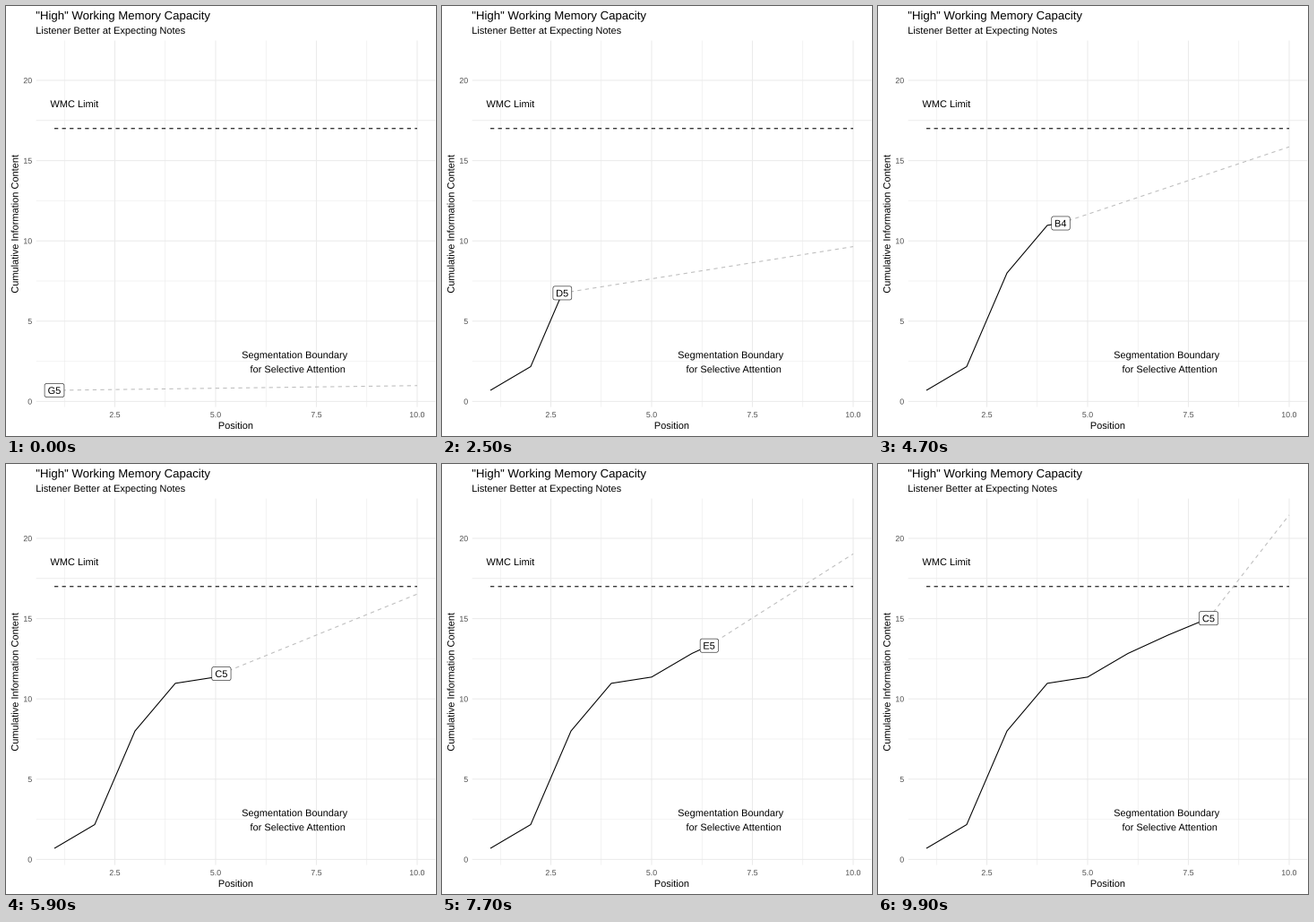
Animation of 480 by 480 pixels, one loop 10 s. Source, as a matplotlib script:

```python
import numpy as np
import matplotlib.pyplot as plt
from matplotlib.animation import FuncAnimation
from matplotlib.patches import FancyBboxPatch, PathPatch
from matplotlib.textpath import TextPath
from matplotlib.transforms import Affine2D

SIZE, DPI = 480, 72
FRAMES, INTERVAL = 100, 100
LINE = 1.07
LEFT, RIGHT, TOP, BOTTOM = 33.75, 479.25, 38.6, 447.6
FONT = {"family": "Liberation Sans"}

NOTES = ["G5", "F5", "D5", "B4", "C5", "E5", "D5", "C5"]
INFO = np.array([0.69, 2.17, 8.0, 10.97, 11.36, 12.83, 13.98, 15.02])
POS = np.arange(1, 9)
# Each note lands on the nearest whole frame.
KEYS = np.round((POS - 1) * (FRAMES - 1) / 7)
LIMIT = 17


def px(pos):
    return 9 + 45 * pos


def py(info):
    return 441.4 - 17.92 * info


def text_path(s, size, x, y, align="center", angle=0):
    """Outline of s with its baseline at (x, y) in pixels, y pointing down."""
    path = TextPath((0, 0), s, size=size, prop=FONT)
    box = path.get_extents()
    shift = {"left": 0, "center": (box.x0 + box.x1) / 2, "right": box.x1}[align]
    move = Affine2D().translate(-shift, 0).rotate_deg(angle).scale(1, -1).translate(x, y)
    return path.transformed(move)


fig = plt.figure(figsize=(SIZE / DPI, SIZE / DPI), dpi=DPI, facecolor="white")
ax = fig.add_axes([0, 0, 1, 1])
ax.set_xlim(0, SIZE)
ax.set_ylim(SIZE, 0)
ax.axis("off")


def write(s, size, x, y, align="center", angle=0, color="black", z=5):
    path = text_path(s, size, x, y, align, angle)
    return ax.add_patch(PathPatch(path, fc=color, lw=0, zorder=z))


def stroke(xs, ys, color, width=LINE, style="-", z=2):
    line, = ax.plot(xs, ys, color=color, lw=width, ls=style, zorder=z,
                    solid_capstyle="butt", dash_capstyle="butt")
    line.set_snap(False)
    return line


def grid(xs, ys, width):
    for x in xs:
        stroke([px(x)] * 2, [TOP, BOTTOM], "#EBEBEB", width, z=1)
    for y in ys:
        stroke([LEFT, RIGHT], [py(y)] * 2, "#EBEBEB", width, z=1)


x_ticks = np.arange(2.5, 10.1, 2.5)
y_ticks = np.arange(0, 21, 5)
grid(x_ticks - 1.25, y_ticks[:-1] + 2.5, LINE / 2)
grid([], [17.5], LINE / 2)
grid(x_ticks, y_ticks, LINE)

for x in x_ticks:
    write(f"{x:.1f}", 8.8, px(x), 459.2, color="#4D4D4D")
for y in y_ticks:
    write(str(y), 8.8, 28.8, py(y) + 3.2, "right", color="#4D4D4D")

write('"High" Working Memory Capacity', 13.2, LEFT - 0.5, 15, "left")
write("Listener Better at Expecting Notes", 11, LEFT - 0.5, 31, "left")
write("Position", 11, (LEFT + RIGHT) / 2, 472)
write("Cumulative Information Content", 11, 13.6, (TOP + BOTTOM) / 2, angle=90)
write("WMC Limit", 11, 76.3, 113)
write("Segmentation Boundary", 11, 322.4, 393.2)
write("for Selective Attention", 11, 325.4, 409.2)

DASH = (0, (4, 4))
stroke([px(1), px(10)], [py(LIMIT)] * 2, "black", style=DASH)
forecast = stroke([], [], "#BEBEBE", style=DASH, z=3)
trace = stroke([], [], "black", z=4)

tag = ax.add_patch(FancyBboxPatch((0, 0), 20, 15.1, fc="white", ec="black", lw=0.55,
                                  boxstyle="round,pad=0,rounding_size=2.16",
                                  zorder=6, snap=False))
note = write(NOTES[0], 11, 0, 0, z=7)


def update(frame):
    pos = np.interp(frame, KEYS, POS)
    info = np.interp(frame, KEYS, INFO)
    x, y = px(pos), py(info)

    past = KEYS < frame
    trace.set_data(np.append(px(POS[past]), x), np.append(py(INFO[past]), y))
    forecast.set_data([x, px(10)], [y, py(info * 10 / 7)])

    # The name switches halfway between two notes.
    name = NOTES[int(pos - 0.5 + 1e-9)]
    path = text_path(name, 11, x, y + 3.95)
    note.set_path(path)
    width = path.get_extents().width + 8.2
    tag.set_bounds(x - width / 2, y - 7.55, width, 15.1)
    return forecast, trace, tag, note


anim = FuncAnimation(fig, update, frames=FRAMES, interval=INTERVAL,
                     repeat=True, repeat_delay=0, blit=False)
plt.show()
```
